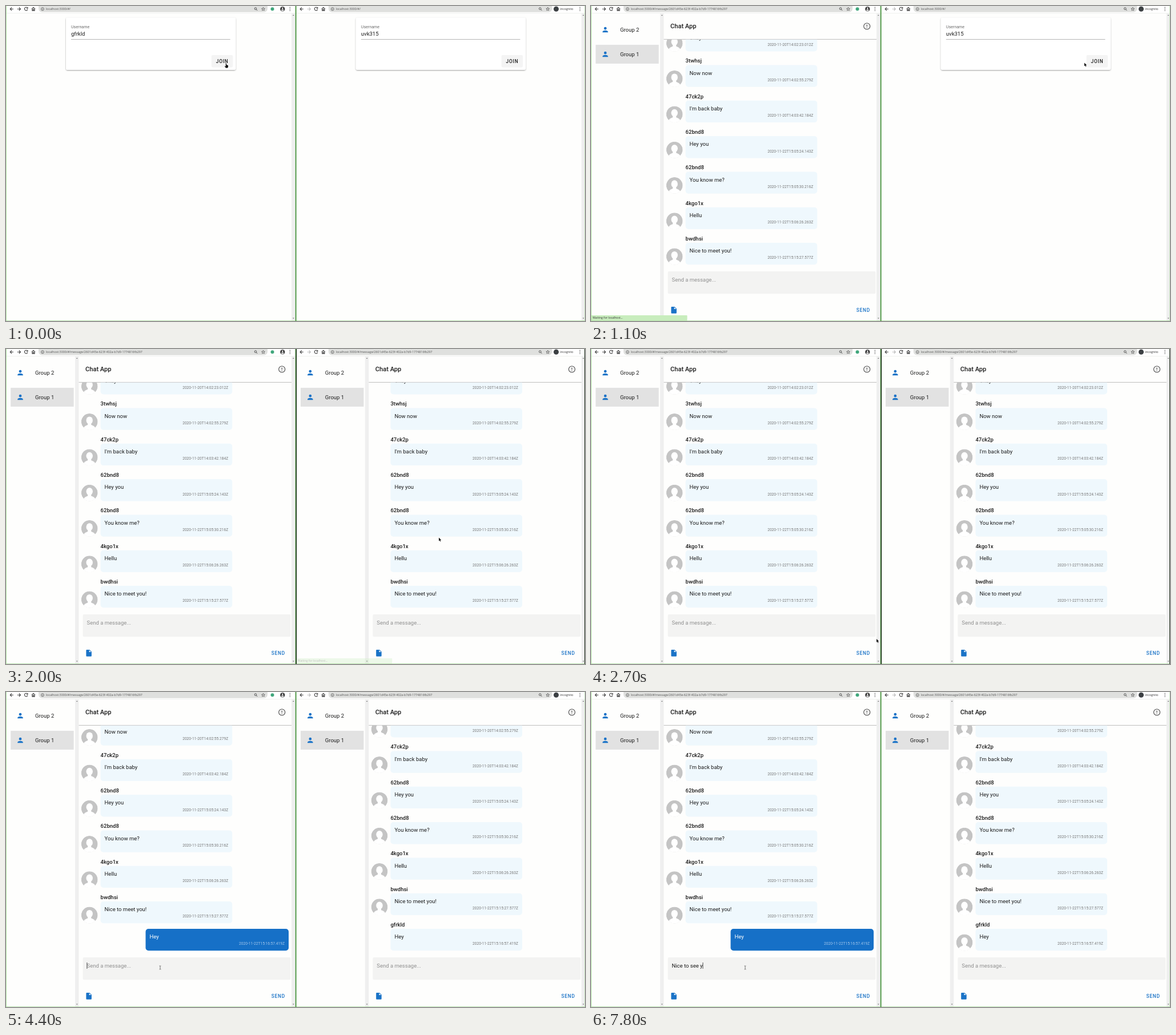
Animation of 1014 by 552 pixels, one loop 8 s. Source, as an HTML page:

```html
<!DOCTYPE html>
<html lang="en">
<head>
<meta charset="utf-8">
<title>Chat App</title>
<style>
html, body { margin: 0; width: 100%; height: 100%; overflow: hidden; background: #fefefd; }
svg { display: block; width: 1014px; height: 552px; }
text { font: 9.5px Roboto, sans-serif; fill: #1c1c1c; white-space: pre; }
.ui { font: 5.3px "Open Sans", "Noto Sans", sans-serif; fill: #555; }
.label { font-size: 7.1px; fill: #6b6b6b; }
.btn { font-size: 8.4px; font-weight: 500; letter-spacing: .089em; }
.title { font-size: 11.1px; font-weight: 500; }
.name { font-weight: 500; }
.time { font-size: 6.65px; fill: #777; text-anchor: end; }
.hint { fill: #909090; }
.blue { fill: #1a73c7; }
.own text { fill: #fff; }
.own .time { fill: #a3c6ea; }
.ico { fill: none; stroke: #444; stroke-width: 1.1; }
</style>
</head>
<body>
<svg id="stage" viewBox="0 0 1014 552"></svg>
<script>
const OFFSET = 507.8, PITCH = 62.3;
const URL_HOME = 'localhost:3000/#/';
const URL_CHAT = URL_HOME + 'message/2601d45e-623f-402a-b7d9-1774816fb297';
const MESSAGES = [
  ['5rvnca', 'Okay', '2020-11-20T14:02:23.012Z'],
  ['3twhsj', 'Now now', '2020-11-20T14:02:55.279Z'],
  ['47ck2p', "I'm back baby", '2020-11-20T14:03:42.184Z'],
  ['62bnd8', 'Hey you', '2020-11-22T15:05:24.143Z'],
  ['62bnd8', 'You know me?', '2020-11-22T15:05:30.216Z'],
  ['4kgo1x', 'Hellu', '2020-11-22T15:06:26.263Z'],
  ['bwdhsi', 'Nice to meet you!', '2020-11-22T15:15:27.577Z'],
  ['gfrkld', 'Hey', '2020-11-22T15:16:57.419Z']
];

const text = (x, y, s, cls = '', attr = '') => `<text x="${x}" y="${y}" class="${cls}" ${attr}>${s}</text>`;
const rect = (x, y, w, h, fill, r = 0, attr = '') =>
  `<rect x="${x}" y="${y}" width="${w}" height="${h}" rx="${r}" fill="${fill}" ${attr}/>`;
const circle = (x, y, r, fill) => `<circle cx="${x}" cy="${y}" r="${r}" fill="${fill}"/>`;
const line = (d, attr = '') => `<path class="ico" d="${d}" ${attr}/>`;
const group = (id, body, attr = '') => `<g id="${id}" ${attr}>${body}</g>`;
const icon = (x, y, d) => `<path class="blue" transform="translate(${x} ${y}) scale(.594)" d="${d}"/>`;

const person = y => icon(17.9, y - 7.1,
  'M12 4a4 4 0 0 1 0 8a4 4 0 0 1 0-8M12 14c4.4 0 8 1.8 8 4v2H4v-2c0-2.200 3.600-4 8-4Z');

const dots = x => [2.5, 5.3, 8.1].map(y => circle(x, y, .75, '#444')).join('');

function scrollbar(x) {
  return rect(x, 13, 6.5, 538, '#efefef') +
    `<path fill="#777" d="M${x + 1.9} 17h2.800l-1.400-1.800zM${x + 1.9} 546.500h2.800l-1.400 1.800z"/>`;
}

function toolbar(side) {
  const right = side === 'R', end = right ? 448.5 : 458;
  const zoom = end - 20.5, star = end - 7.5;
  return rect(0, 0, 506.5, 12.5, '#fff') + rect(0, 12.5, 506.500, .6, '#e6eae4') +
    rect(57, -8, end - 57, 18.8, '#dfe0de', 6) +
    line('M13 5.200H7.500M10 2.500L7.300 5.200L10 8') +
    line('M19.800 5.200h5.500M22.800 2.500L25.500 5.200L22.800 8', right ? 'style="stroke:#bbb"' : '') +
    line('M37.300 3.200A2.800 2.800 0 1 0 37.900 6M38 2v2.200h-2.200') +
    line('M45 5.200L48 2.400L51 5.200M45.900 5v3.100h1.400V6h1.400v2.100h1.400V5') +
    line('M66.500 5.300a2.500 2.500 0 1 1-5 0a2.500 2.500 0 1 1 5 0M64 5v1.700M64 3.700v.7', 'style="stroke-width:.7"') +
    text(70, 7.2, URL_HOME, 'ui', `id="url${side}"`) +
    line(`M${zoom + 1.3} 4.600a1.800 1.800 0 1 1-3.600 0a1.800 1.800 0 1 1 3.600 0M${zoom + .8} 6l2 2`, 'style="stroke-width:.9"') +
    line(`M${star} 2.300l.8 2 2.100.1-1.600 1.400.5 2.100-1.800-1.100-1.800 1.100.5-2.100-1.600-1.400 2.100-.1z`, 'style="stroke-width:.7"') +
    (right
      ? circle(455.7, 5.2, 4.5, '#3c4043') + text(462.8, 7, 'incognito', 'ui', 'style="fill:#333"')
      : circle(466.5, 5.2, 3, '#41a77c') + circle(484.3, 5.2, 4, '#333') +
        circle(484.3, 4, 1.3, '#fff') + '<ellipse cx="484.300" cy="7.300" rx="2.300" ry="1.200" fill="#fff"/>') +
    dots(497.3);
}

function login(side, user) {
  return rect(105, 20.2, 297.3, 91.8, '#fff', 2.4, 'filter="url(#shadow)"') +
    text(114, 39.1, 'Username', 'label') + text(114, 52.2, user) +
    rect(114, 58.2, 278.700, .7, '#969696') +
    rect(359.8, 86, 37.6, 21.4, '#f4f4f4', 2.4) +
    (side === 'L' ? '<circle id="ripple" cx="385" cy="101" r="0" fill="#000" opacity=".1" clip-path="url(#button)"/>' : '') +
    text(367.8, 99.5, 'JOIN', 'btn');
}

function avatar(y) {
  return `<g transform="translate(146.200 ${y})" clip-path="url(#round)">` + circle(0, 0, 14.4, '#c4c4c4') +
    '<ellipse cy="-2.500" rx="5.700" ry="6.600" fill="#fff"/>' +
    '<path fill="#fff" d="M-3 2h6v3.500c4 1.500 7.500 2.500 8 9h-22c.5-6.500 4-7.500 8-9z"/></g>';
}

function bubble(y, x, w, fill, msg) {
  return rect(x, y, w, 38.3, fill, 5) + text(x + 7, y + 17.3, msg[1]) + text(x + w - 7, y + 28.4, msg[2], 'time');
}

function messageList(side) {
  let bubbles = '', faces = '', lastFace = '';
  MESSAGES.forEach((msg, i) => {
    if (i === 7 && side === 'L') return;
    const y = 415 + (i - 6) * PITCH;
    bubbles += text(165.6, y - 4.1, msg[0], 'name') + bubble(y, 165.6, 230.6, '#eff8fd', msg);
    if (i < 7) faces += avatar(y + 24); else lastFace = avatar(y + 24);
  });
  if (side === 'L') bubbles += `<g class="own">${bubble(463, 244.5, 250.5, '#1670c7', MESSAGES[7])}</g>`;
  return `<g clip-path="url(#list)">` +
    group('scroll' + side, bubbles + group('faces' + side, faces) + group('last' + side, lastFace)) + '</g>';
}

function chat(side) {
  return rect(8.2, 68, 110.4, 33, '#e2e2e2') +
    person(41.5) + person(84.5) + text(51, 45, 'Group 2') + text(51, 88, 'Group 1') +
    scrollbar(121) + rect(127.5, 57.9, 372.500, 1, '#bdbdbd') +
    text(139, 39.4, 'Chat App', 'title') +
    group('content' + side, messageList(side) +
      line('M488.700 35.500a5.500 5.500 0 1 1-11 0a5.500 5.500 0 1 1 11 0M483.200 32.500v3.800M483.200 37.500v1.200')) +
    rect(134.5, 465, 364, 39.3, '#f3f3f2', 2.4) +
    text(141.5, 482.6, 'Send a message...', 'hint', `id="hint${side}"`) +
    (side === 'L' ? text(141.5, 482.6, '', '', 'id="typed"') + rect(141.5, 474, .8, 11, '#222', 0, 'id="caret"') : '') +
    icon(138, 525.7, 'M13 9V3.500L18.500 9M6 2C4.900 2 4 2.900 4 4v16a2 2 0 0 0 2 2h12a2 2 0 0 0 2-2V8l-6-6Z') +
    text(464.7, 536, 'SEND', 'btn blue');
}

const pane = (side, user) =>
  `<g transform="translate(${side === 'R' ? OFFSET : 0})">` + toolbar(side) + scrollbar(500) +
  group('login' + side, login(side, user)) + group('chat' + side, chat(side)) +
  group('status' + side, rect(.5, 542, 168, 9.3, '#c8edbd', 1) +
    text(3, 548.3, 'Waiting for localhost...', 'ui', 'style="font-size:5.1px;fill:#333"')) + '</g>';

document.getElementById('stage').innerHTML = `<defs>
  <filter id="shadow" x="-5%" y="-10%" width="110%" height="125%">
    <feDropShadow dx="0" dy="1" stdDeviation=".9" flood-color="#000" flood-opacity=".38"/></filter>
  <clipPath id="button">${rect(359.8, 86, 37.6, 21.4, '#000', 2.4)}</clipPath>
  <clipPath id="list">${rect(127.5, 58.8, 372.5, 396.2, '#000')}</clipPath>
  <clipPath id="round">${circle(0, 0, 14.4, '#000')}</clipPath></defs>` +
  rect(0, 0, 1014, 552, '#fefefd') + pane('L', 'gfrkld') + pane('R', 'uvk315') +
  rect(0, 0, .8, 552, '#9fdc92') + rect(0, 551.2, 1014, .8, '#a9dc9d') + rect(1013.3, 0, .7, 552, '#b5dcab') +
  rect(506.7, 0, 1.8, 552, '#428f38') +
  group('focus', rect(507.7, 0, 1.4, 552, '#20301d') + rect(1013, 0, 1, 552, '#20301d')) +
  group('pointer',
    group('arrow', '<path d="M0 0v6l1.400-1.200 1 2.200 1-.5-1-2.100 1.800-.2z" fill="#111" stroke="#fff" stroke-width=".5" paint-order="stroke"/>') +
    group('hand', '<path d="M-.7 0h1.300v2.600l2.800.8.2 2.100-.8 2.600h-3.400l-2-3 .6-.6 1.300.9z" fill="#111" stroke="#fff" stroke-width=".5" paint-order="stroke"/>') +
    group('beam', '<path d="M-1.500-3h1.100l.4.400.4-.4h1.100M0-2.600v5.200M-1.500 3h1.100l.4-.4.4.400h1.100" fill="none" stroke="#555" stroke-width=".8"/>'));

const $ = {};
document.querySelectorAll('[id]').forEach(el => $[el.id] = el);
const show = (id, on) => $[id].style.display = on ? '' : 'none';

const PATH = [
  [0, 385.5, 100.5], [800, 385.5, 100.5], [900, 500, 104], [1000, 720, 108], [1100, 864, 99.5],
  [1200, 882, 98], [1700, 882, 98], [1900, 790, 290], [2000, 758, 330.5], [2200, 757, 340], [2400, 757, 340],
  [2500, 735, 380], [2600, 640, 460], [2700, 500, 508], [2800, 370, 505], [2900, 295, 488], [3000, 270, 483]
];
const TYPING = [
  [0, ''], [3800, 'H'], [3900, 'He'], [4000, 'Hey'], [4300, ''], [6000, 'N'], [6100, 'Ni'], [6300, 'Nic'],
  [6400, 'Nice'], [6600, 'Nice '], [6700, 'Nice t'], [6800, 'Nice to'], [7000, 'Nice to '],
  [7200, 'Nice to s'], [7600, 'Nice to se'], [7700, 'Nice to see '], [7800, 'Nice to see y']
];
const between = (t, a, b) => t >= a && t < b;

function pointerAt(t) {
  const i = PATH.findIndex(p => p[0] > t);
  if (i < 0) return PATH[PATH.length - 1].slice(1);
  const [a, ax, ay] = PATH[i - 1], [b, bx, by] = PATH[i], k = (t - a) / (b - a);
  return [ax + (bx - ax) * k, ay + (by - ay) * k];
}

function drawPane(side, t, start, faces, status) {
  const joined = t >= start;
  show('login' + side, !joined);
  show('chat' + side, joined);
  show('content' + side, t >= start + 100);
  show('faces' + side, t >= faces);
  $['url' + side].textContent = joined ? URL_CHAT : URL_HOME;
  $['status' + side].setAttribute('opacity', between(t, status, status + 300) ? (t < status + 100 ? .3 : 1) : 0);
}

function draw(t) {
  drawPane('L', t, 800, 1000, 900);
  drawPane('R', t, 1600, 2100, 2000);
  $.scrollL.setAttribute('transform', `translate(0 ${t >= 4300 ? -48 : 0})`);
  $.scrollR.setAttribute('transform', `translate(0 ${t >= 4400 ? -PITCH : 0})`);
  show('lastR', t >= 4500);
  show('focus', between(t, 1500, 3200));
  $.ripple.setAttribute('r', between(t, 200, 400) ? (t < 300 ? 11 : 28) : 0);

  const typed = TYPING.filter(k => k[0] <= t).pop()[1];
  $.typed.textContent = typed;
  show('hintL', !typed);
  show('caret', typed || between(t, 3200, 3600) || between(t, 4300, 5000) || between(t, 5500, 6000));
  $.caret.setAttribute('x', 141.5 + (typed ? $.typed.getComputedTextLength() : 0));

  const [x, y] = pointerAt(t), px = x > OFFSET ? x - OFFSET : x;
  const onLogin = t < (x > OFFSET ? 1600 : 800);
  const hand = onLogin && between(px, 359.8, 397.4) && between(y, 86, 107.4);
  const beam = !onLogin && between(px, 134.5, 498.5) && between(y, 465, 504.3);
  $.pointer.setAttribute('transform', `translate(${x} ${y})`);
  show('hand', hand);
  show('beam', beam);
  show('arrow', !hand && !beam);
}

const origin = performance.now();
let last = -1;
function tick() {
  const t = Math.floor((performance.now() - origin) % 8000 / 100) * 100;
  if (t !== last) draw(last = t);
  requestAnimationFrame(tick);
}
tick();
</script>
</body>
</html>
```
